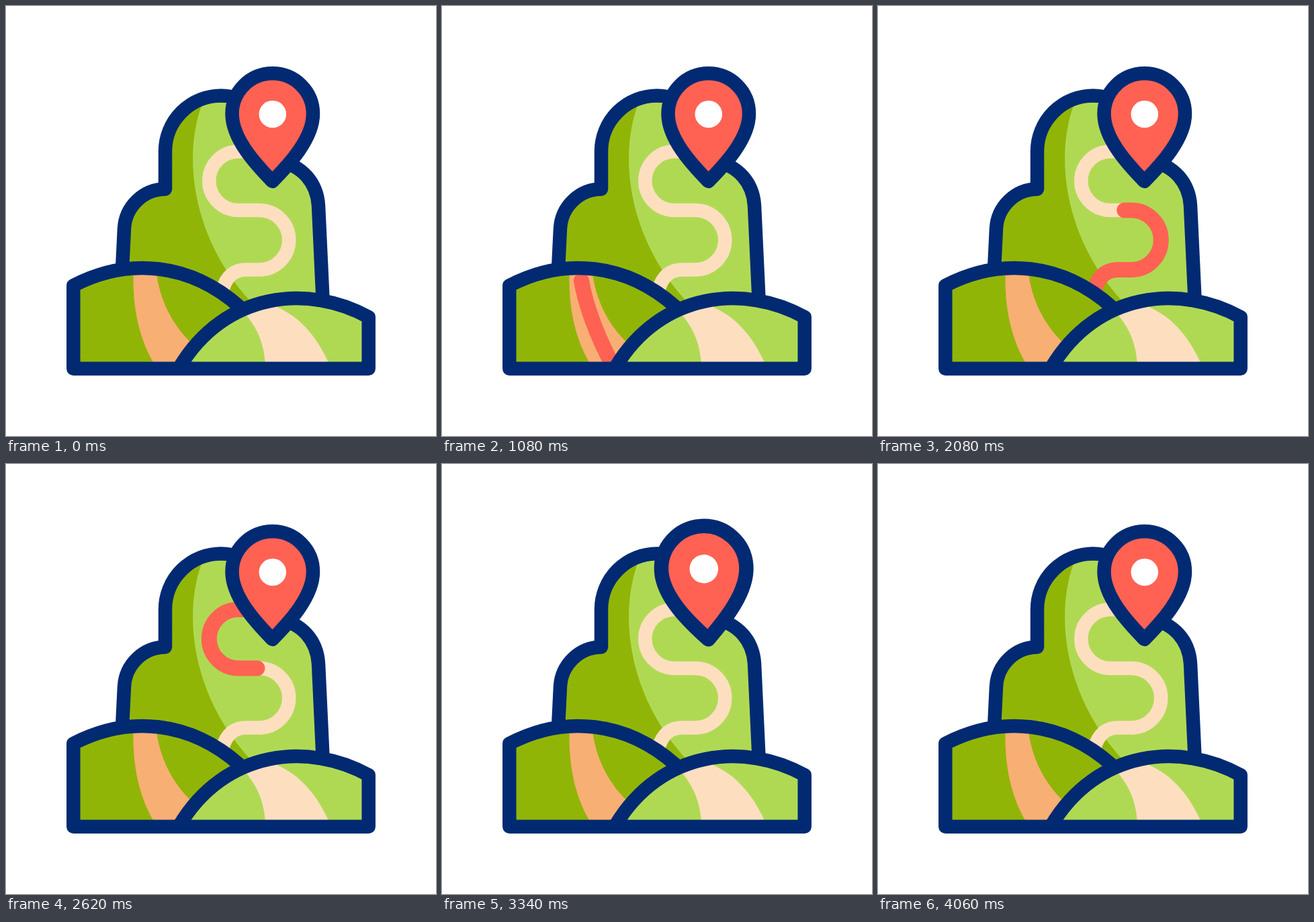
These frames come from a looping animation (640x640 px, 4200 ms). An HTML page with a canvas:

```html
<!DOCTYPE html>
<html lang="en">
<head>
<meta charset="utf-8">
<title>Mountain trail</title>
<style>
html, body { margin: 0; width: 100%; height: 100%; overflow: hidden; background: #fff; }
canvas { display: block; width: 640px; height: 640px; }
</style>
</head>
<body>
<canvas id="stage" width="640" height="640"></canvas>
<script>
const ctx = document.getElementById('stage').getContext('2d');
const LOOP = 4200;
const NAVY = '#022a72', DARK = '#91b507', LIGHT = '#b0d953';
const RED = '#ff6253', PEACH = '#fddfbf', ORANGE = '#f8af73';

const shape = d => new Path2D(d);
const route = d => {
  const el = document.createElementNS('http://www.w3.org/2000/svg', 'path');
  el.setAttribute('d', d);
  return { path: shape(d), length: el.getTotalLength() };
};

const ridge = 'M173 392 L176 331 C178 298 205 272.5 237 272.5 V216 A83 83 0 0 1 320 133.5 A83 83 0 0 1 403 216 V230 C442 237 463 264 465 297 L471.5 436';
const mountain = shape(ridge + ' V480 H173 Z');
const mountainLine = shape(ridge);
const shade = shape('M294 140 C260 225 279 350 366 442 V490 H150 V120 H300 Z');
const backHill = shape('M100.3 539.8 V416 C183 373 275 383 348 448 L262 539.8 Z');
const backLine = shape('M262 539.8 H100.3 V416 C183 373 275 383 348 448');
const backTrail = shape('M190 390 C187 450 199 500 225 540 H310 L285 510 C250 480 228 440 223 390 Z');
const frontHill = shape('M258 538 C326 424 452 414 539.7 463 V539.8 H258 Z');
const frontTrail = shape('M348 450 C374 475 386 505 386 540 H484 C468 500 440 460 395 445 Z');
const pin = shape('M396.5 261 C371.5 235.5 336.5 197.5 336.5 160.5 A60.2 60.2 0 0 1 457 160.5 C457 197.5 421.5 235.5 396.5 261 Z');

const frontRoute = route('M434 555 C430 500 412 466 381 459 L330 445');
const backRoute = route('M262 550 C240 510 212 450 205.5 396 L204 380');
const peakRoute = route('M322 423 C328 402 340 392.5 358 392.5 H377 A44.2 44.2 0 0 0 377 304 H345 A43.8 43.8 0 0 1 345 216.5 H397'.replaceAll('345', '344'));

// time, scale, degrees
const sway = [
  [2660, 1, 0], [3050, 0.95, 8], [3300, 1.053, -4], [3620, 0.98, 1], [4060, 1, 0]
];

const ramp = (t, a, b) => Math.min(1, Math.max(0, (t - a) / (b - a)));
const ease = u => (1 - Math.cos(Math.PI * u)) / 2;

function swayAt(t) {
  if (t <= sway[0][0]) return [1, 0];
  for (let i = 1; i < sway.length; i++) {
    const a = sway[i - 1], b = sway[i];
    if (t < b[0]) {
      const u = ease(ramp(t, a[0], b[0]));
      return [a[1] + (b[1] - a[1]) * u, a[2] + (b[2] - a[2]) * u];
    }
  }
  return [1, 0];
}

function fill(path, color) {
  ctx.fillStyle = color;
  ctx.fill(path);
}

function line(path, color = NAVY, width = 20.5) {
  ctx.strokeStyle = color;
  ctx.lineWidth = width;
  ctx.stroke(path);
}

function within(path, draw) {
  ctx.save();
  ctx.clip(path);
  draw();
  ctx.restore();
}

// Red stretch of a route between its tail and head fractions
function trace(r, head, tail) {
  if (head <= tail) return;
  ctx.save();
  ctx.setLineDash([(head - tail) * r.length, 9999]);
  ctx.lineDashOffset = -tail * r.length;
  line(r.path, RED, 23);
  ctx.restore();
}

function drawPin(t) {
  const [scale, deg] = swayAt(t);
  ctx.save();
  ctx.translate(396.5, 262);
  ctx.rotate(deg * Math.PI / 180);
  ctx.scale(scale, scale);
  ctx.translate(-396.5, -262);
  fill(pin, RED);
  line(pin);
  ctx.beginPath();
  ctx.arc(396.8, 161, 20.3, 0, Math.PI * 2);
  ctx.fillStyle = '#fff';
  ctx.fill();
  ctx.restore();
}

function render(t) {
  ctx.fillStyle = '#fff';
  ctx.fillRect(0, 0, 640, 640);
  ctx.lineJoin = ctx.lineCap = 'round';

  fill(mountain, LIGHT);
  within(mountain, () => fill(shade, DARK));
  line(peakRoute.path, PEACH);
  trace(peakRoute, ramp(t, 1580, 2560), ramp(t, 2061, 3193));
  line(mountainLine);
  drawPin(t);

  fill(backHill, DARK);
  within(backHill, () => {
    fill(backTrail, ORANGE);
    trace(backRoute, ramp(t, 720, 1150), ramp(t, 1150, 1580));
  });
  line(backLine);

  fill(frontHill, LIGHT);
  within(frontHill, () => {
    fill(frontTrail, PEACH);
    trace(frontRoute, ramp(t, 20, 400), ramp(t, 350, 775));
  });
  line(frontHill);
}

const start = performance.now();
function tick(now) {
  render(Math.max(0, now - start) % LOOP);
  requestAnimationFrame(tick);
}
render(0);
requestAnimationFrame(tick);
</script>
</body>
</html>
```
